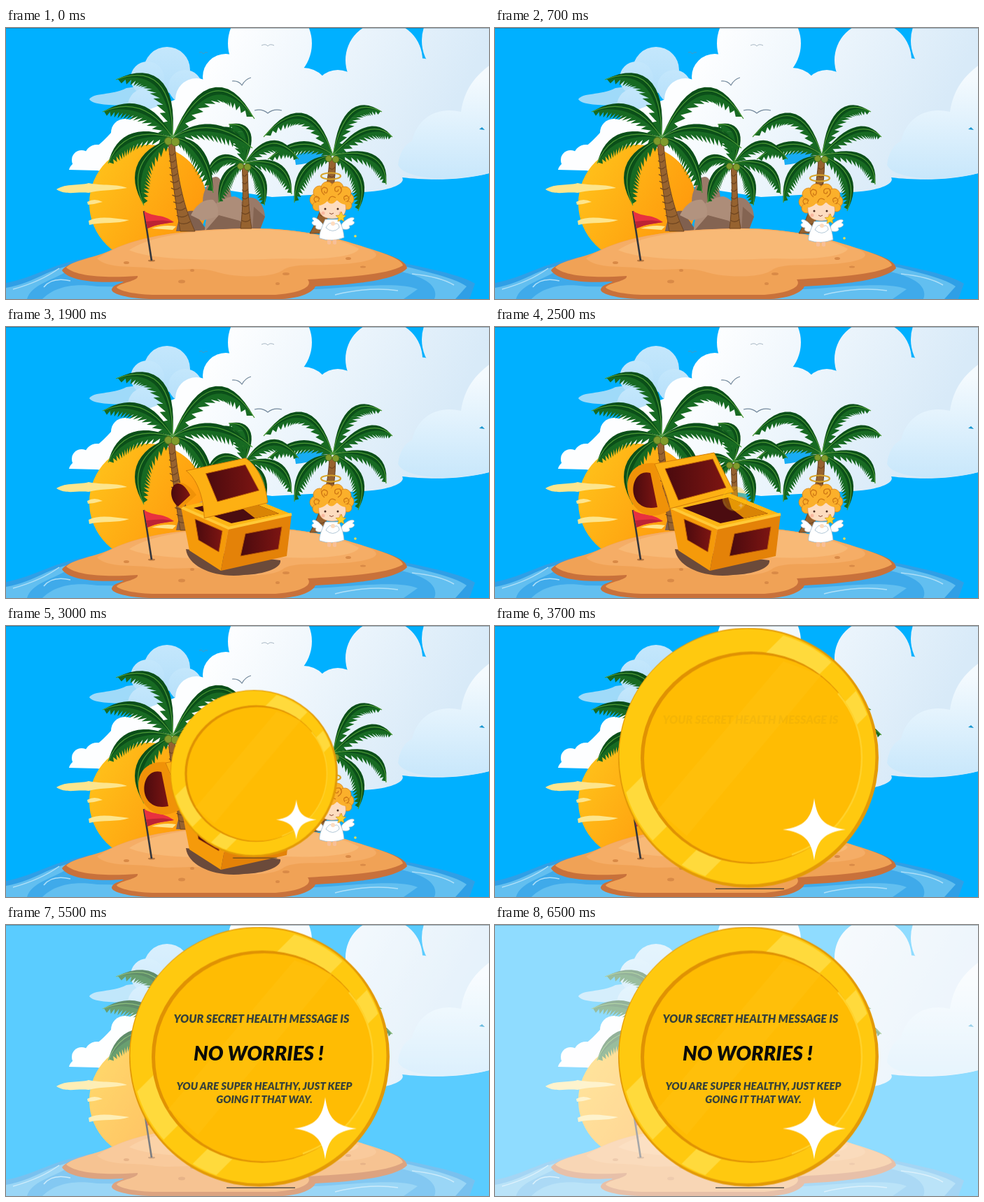
These frames come from a looping animation (690x388 px, 7000 ms). An HTML page:

```html
<!DOCTYPE html>
<html lang="en">
<head>
<meta charset="utf-8">
<title>Treasure island</title>
<style>
html, body { margin: 0; width: 100%; height: 100%; overflow: hidden; background: #00b0ff; }
svg { display: block; width: 100%; height: 100%; }
text { font-family: Lato, "Open Sans", sans-serif; font-style: italic; font-weight: 900; text-anchor: middle; fill: #37413a; }
svg { --ease: cubic-bezier(.37, 0, .63, 1); }
.move { animation: 7s var(--ease) infinite; }
.angel { animation-name: bob; }
.chest { animation-name: chest; }
.veil { animation-name: veil; }
.coin { animation-name: grow; }
.glow { animation-name: glow; }
.intro { animation-name: intro; }
.verdict { animation-name: verdict; }
.shell { animation-name: shell; }
.end { animation-name: end; }
.panel { animation-name: panel; }
.endpanel { animation-name: endpanel; }
.latch { animation-name: latch; }
@keyframes bob { 0% { transform: translateY(0); } 18%, 100% { transform: translateY(5px); } }
@keyframes chest { 0%, 14.29% { opacity: 0; } 25.71%, 100% { opacity: 1; } }
@keyframes veil { 0%, 68.57% { opacity: 0; } 85.71%, 100% { opacity: .56; } }
@keyframes intro { 0%, 51.4% { opacity: 0; } 61.4%, 100% { opacity: 1; } }
@keyframes verdict { 0%, 66.43% { opacity: 0; } 77.14%, 100% { opacity: 1; } }
@keyframes glow { 0%, 32.86% { opacity: 0; } 40%, 100% { opacity: 1; } }
@keyframes grow {
  0%, 32.86% { transform: translate(341px, 250px) scale(.03); }
  50%, 100% { transform: translate(362px, 188.5px) scale(1); }
}
@keyframes shell {
  0%, 22.8% { d: path("M318 288C320 240 308 218 288 216L372 196C398 198 412 230 408 268Z"); }
  31.4%, 100% { d: path("M250 260C246 240 236 215 228 196L313 180C322 198 332 218 341 236Z"); }
}
@keyframes end {
  0%, 22.8% { d: path("M250 258C255 190 325 205 318 288Z"); }
  31.4%, 100% { d: path("M250 262C190 300 160 190 228 195Z"); }
}
@keyframes panel {
  0%, 22.8% { d: path("M330 217L374 206L394 238L344 252Z"); }
  31.4%, 100% { d: path("M243 203L311 189L330 230L262 248Z"); }
}
@keyframes endpanel {
  0%, 22.8% { d: path("M260 256C264 208 300 206 306 274Z"); }
  31.4%, 100% { d: path("M232 258C185 268 190 200 222 209Z"); }
}
@keyframes latch { 0%, 22.8% { opacity: 1; } 25%, 100% { opacity: 0; } }
</style>
</head>
<body>
<svg viewBox="0 0 690 388" preserveAspectRatio="none">
<defs>
  <linearGradient id="sun" x1="0" y1="0" x2="1" y2=".6"><stop stop-color="#ffc61c"/><stop offset="1" stop-color="#ff980c"/></linearGradient>
  <linearGradient id="sky" gradientUnits="userSpaceOnUse" x1="300" y1="40" x2="590" y2="200"><stop stop-color="#fdfeff"/><stop offset="1" stop-color="#d8eaf8"/></linearGradient>
  <linearGradient id="mist" x1="0" y1="0" x2="0" y2="1"><stop offset=".1" stop-color="#f4fafe"/><stop offset="1" stop-color="#c8e7fb"/></linearGradient>
  <linearGradient id="lump" x1="0" y1="0" x2="0" y2="1"><stop stop-color="#c4e7fc"/><stop offset="1" stop-color="#b4dffa"/></linearGradient>
  <linearGradient id="red" x1="0" y1="0" x2="1" y2="0"><stop stop-color="#4a0a0e"/><stop offset="1" stop-color="#7d1512"/></linearGradient>
  <clipPath id="disc"><circle r="181" cx="-1" cy="-1"/></clipPath>
</defs>
<rect width="690" height="388" fill="#00b0ff"/>

<path d="M119 102C126 92 150 97 172 86L215 80L205 108C170 112 124 112 119 102Z" fill="#9fdaf9"/>
<g id="haze" fill="url(#lump)"></g>
<g fill="url(#sky)">
  <g id="clouds"></g>
  <path d="M90 203C94 188 120 184 150 150L190 122L270 92L450 72L690 62V208C650 219 600 218 566 214C572 224 545 234 508 235L380 242L130 204Z"/>
</g>
<path d="M580 162C588 128 616 112 650 120C655 86 672 68 690 54V208C640 220 570 218 560 196C562 178 570 166 580 162Z" fill="url(#mist)"/>
<path d="M412 183Q432 173 456 180Q450 192 414 196Z" fill="#18acf4"/>
<path d="M676 145l4-3 4 4z" fill="#1595cf"/>
<g fill="none" stroke="#74899c" stroke-width="1.2">
  <path d="M323 76Q332 75 337 82Q342 73 350 71M355 118Q366 115 374 122Q382 115 394 118"/>
  <path d="M365 25Q371 22 374 26Q377 22 383 25M276 35Q280 33 282 37Q284 34 288 35" stroke-width="1" opacity=".6"/>
</g>

<circle cx="203" cy="251" r="84" fill="url(#sun)"/>
<g fill="#fde58d">
  <path d="M72 231C86 222 105 226 118 222C136 226 160 223 173 229C150 233 132 232 118 236C100 234 86 240 72 231Z"/>
  <path d="M116 249Q126 243 138 249Q128 252 117 253ZM118 276C135 268 155 273 176 275C160 281 138 277 119 282ZM208 287Q225 281 243 284L238 289Z"/>
</g>

<path d="M0 388V365C45 356 65 337 125 327H530C585 342 645 350 670 366L662 388Z" fill="#2f9fe6"/>
<path d="M0 388V372C45 364 55 345 110 336H550C585 346 640 356 658 370L642 388Z" fill="#62bff0"/>
<path d="M30 388C36 368 64 362 84 350L560 348C590 354 620 366 612 388Z" fill="#3faaea"/>
<path d="M52 388C66 374 90 364 130 370L440 374C490 372 560 362 588 374L568 388Z" fill="#62bff0"/>
<path d="M54 371Q66 356 92 362M580 352Q620 356 640 368M470 382Q520 370 560 376M10 374Q50 363 76 344" stroke="#b0e0f8" stroke-width="1.500" fill="none"/>

<g fill="#9a7a68">
  <path d="M243 291C246 270 254 260 268 262L288 291Z" fill="#80604f"/>
  <path d="M282 258C278 236 288 226 292 216Q304 208 308 222Q322 224 322 246L306 262Z"/>
  <path d="M284 291C284 262 300 244 326 241C340 244 352 262 356 291Z" fill="#ad8d79"/>
  <path d="M336 250C350 234 368 246 370 270L362 291H344Z"/>
  <path d="M264 268Q276 244 296 246Q306 256 302 270L280 276Z" fill="#b2937f"/>
  <path d="M284 291L304 268L334 276L348 291ZM354 256L370 270L362 291H352Z" fill="#846452"/>
</g>

<path d="M80 347C88 334 130 329 150 319C190 300 240 290 350 288C430 288 480 304 520 317C550 325 572 333 573 344C556 362 490 368 442 370C438 380 415 388 390 388H205C175 387 150 381 151 374C154 366 166 366 168 363C120 366 88 360 80 347Z" fill="#c8713b"/>
<path d="M86 343C94 333 130 328 150 318C190 299 240 289 350 287C430 287 480 303 520 316C545 324 566 332 567 340C545 354 480 357 431 360C440 372 415 380 385 382H215C185 382 160 376 158 371C166 364 190 362 188 355C140 358 102 356 86 343Z" fill="#f0a256"/>
<path d="M130 330C170 304 230 288 350 287C430 287 480 303 520 317C540 326 526 335 480 338C440 341 410 336 395 347C375 360 320 356 300 349C270 340 240 350 208 344C180 340 145 345 130 330Z" fill="#f5ad66"/>
<path d="M176 318C210 295 280 289 350 288C420 288 480 302 504 316C500 328 450 332 400 330C340 332 215 336 176 318Z" fill="#f8b976"/>
<g fill="#d98a47">
  <ellipse cx="172" cy="336" rx="4" ry="2"/><ellipse cx="251" cy="363" rx="5" ry="2.5"/><ellipse cx="266" cy="347" rx="3" ry="2"/>
  <ellipse cx="400" cy="352" rx="5" ry="2"/><ellipse cx="489" cy="330" rx="4" ry="2"/><ellipse cx="388" cy="366" rx="3" ry="2"/><ellipse cx="510" cy="342" rx="4" ry="1.5"/>
</g>

<g id="palms"></g>

<ellipse cx="208" cy="333" rx="5" ry="1.5" fill="#b97840"/>
<path d="M197 262L208 333" stroke="#33363c" stroke-width="2.6"/>
<path d="M197 262C214 272 222 265 240 278C226 280 216 281 202 287Z" fill="#e8313f"/>
<path d="M200 277C214 276 224 274 240 278C226 280 216 281 202 287Z" fill="#bd2334"/>

<g class="angel move">
  <ellipse cx="464" cy="212" rx="14" ry="4.5" fill="none" stroke="#d8a52c" stroke-width="2.2"/>
  <g fill="#fff" stroke="#9fb9cc" stroke-width=".8">
    <path d="M452 280C440 266 434 272 440 276C434 278 438 283 443 283C440 288 447 290 455 287ZM480 280C492 267 502 271 495 276C501 278 496 283 490 283C494 288 486 290 478 287Z"/>
    <path d="M456 274C451 286 447 294 448 301Q465 307 483 300C482 290 480 282 475 274Z"/>
  </g>
  <path d="M459 303v6q3 2 5 0v-6zM467 303v6q3 2 5 0v-6z" fill="#f7bf98"/>
  <g fill="#fbb02b" stroke="#d5811a" stroke-width=".8">
    <circle cx="443" cy="246" r="9"/><circle cx="488" cy="245" r="9"/><circle cx="445" cy="255" r="7"/><circle cx="488" cy="254" r="6"/>
    <circle cx="448" cy="235" r="9"/><circle cx="459" cy="229" r="9"/><circle cx="473" cy="229" r="9"/><circle cx="484" cy="236" r="9"/>
    <circle cx="466" cy="243" r="17" stroke="none"/>
  </g>
  <path d="M447 252C452 244 481 244 485 253C488 270 476 273 466 273C456 273 445 269 447 252Z" fill="#fddcc0" stroke="#d78e5a" stroke-width=".7"/>
  <path d="M446 254Q449 238 466 239Q483 239 486 253Q477 252 473 246Q465 256 459 248Q453 254 446 254Z" fill="#fbb02b"/>
  <path d="M455 239q-8-7-1-11q8 1 4 8q-4 1-3-3M474 239q9-6 3-12q-9-1-7 6q4 3 5-2M443 250q-6-5 0-9q7 1 3 7M487 249q6-5 0-9q-7 1-3 7M461 247q2-9 10-4" fill="none" stroke="#cf7714" stroke-width="1.3"/>
  <g fill="#4a2a20"><circle cx="456" cy="259" r="1.5"/><circle cx="474" cy="259" r="1.5"/></g>
  <g fill="#f9b9a0"><circle cx="453" cy="265" r="2.5"/><circle cx="478" cy="265" r="2.5"/></g>
  <path d="M462 265q3 3 6 0" fill="none" stroke="#8a4634"/>
  <path d="M457 286C461 278 465 278 468 282C472 278 476 280 476 286Q467 295 457 286Z" fill="#fff" stroke="#9fb9cc" stroke-width=".8"/>
  <circle cx="467" cy="280" r="3" fill="#fddcc0"/>
  <path d="M479 263l2 5 5 .5-4 3.500 1 5-4-2.500-5 2.500 1-5-4-3.500 5-.5z" fill="#fbd02d" stroke="#c98a14" stroke-width=".6"/>
  <circle cx="499" cy="298" r="1.8" fill="#f2dc4a"/>
</g>

<g class="chest move">
  <path d="M257 318C260 344 300 360 340 355C370 354 394 345 392 334Z" fill="#6b4a3a"/>
  <path d="M250 258L335 238L408 268L318 288Z" fill="#fdb515"/>
  <path d="M268 259L333 244L390 267L322 281Z" fill="#4b0c10"/>
  <path d="M333 244L390 267L356 274L338 260Z" fill="#d98405"/>
  <path d="M250 258L318 288L307 349L262 320Z" fill="#f59a0a"/>
  <path d="M318 288L408 268L401 328L307 349Z" fill="#e48208"/>
  <path d="M250 258L318 288L408 268" fill="none" stroke="#ffc938" stroke-width="4"/>
  <path d="M270 275L309 292L304 322L275 305Z" fill="url(#red)" stroke="#b85b06"/>
  <path d="M342 296L394 286L389 318L335 328Z" fill="url(#red)" stroke="#b85b06"/>
  <path class="end move" d="M250 258C255 190 325 205 318 288Z" fill="#f09208"/>
  <path class="endpanel move" d="M260 256C264 208 300 206 306 274Z" fill="url(#red)"/>
  <path class="shell move" d="M318 288C320 240 308 218 288 216L372 196C398 198 412 230 408 268Z" fill="#fdb013" stroke="#d37d08"/>
  <path class="panel move" d="M330 217L374 206L394 238L344 252Z" fill="url(#red)" stroke="#b85b06"/>
  <path class="latch move" d="M370 265L384 262V280L377 286L370 283Z" fill="#8a4a08"/>
</g>

<rect class="veil move" width="690" height="388" fill="#fff"/>
<rect width="690" height="1" fill="#20404e" opacity=".35"/>

<g class="glow move"><g class="coin move">
  <path d="M-47 188H51" stroke="#222a2c" stroke-width="1.3"/>
  <circle r="186" fill="#e39a06"/>
  <circle cx="-1.500" cy="-1.500" r="183" fill="#ffc90f"/>
  <g clip-path="url(#disc)" fill="#ffda3c">
    <path d="M-230 105L85 -210L152 -170L-175 157Z"/>
    <path d="M-110 168L168 -110L190 -82L-80 188Z"/>
  </g>
  <ellipse cx="4" rx="158" ry="152" fill="#e09203"/>
  <ellipse cx="7" cy="1" rx="156" ry="149" fill="#ffbc03"/>
  <path d="M-130 75L50 -138L104 -118L-88 112Z" fill="#ffc20f" opacity=".6"/>
  <path d="M62 139C125 116 162 62 162 0C162 -34 150 -66 128 -92" fill="none" stroke="#ffd22c" stroke-width="2.5"/>
  <path d="M94 58C98 88 108 99 139 103C108 107 98 118 94 147C90 118 80 107 49 103C80 99 90 88 94 58Z" fill="#fff"/>
</g></g>

<text class="intro move" x="365" y="140" font-size="16.100">YOUR SECRET HEALTH MESSAGE IS</text>
<g class="verdict move">
  <text x="361" y="194" font-size="28.700" style="fill:#0b0b08">NO WORRIES !</text>
  <text x="369" y="236" font-size="15">YOU ARE SUPER HEALTHY, JUST KEEP</text>
  <text x="369" y="255" font-size="14.800">GOING IT THAT WAY.</text>
</g>
</svg>
<script>
const $ = id => document.getElementById(id);
const puffs = list => list.map(([x, y, r]) => {
  return `<path d="M${x - r} ${y}a${r} ${r} 0 1 1 ${2 * r} 0a${r} ${r} 0 1 1 ${-2 * r} 0"/>`;
}).join('');
$('haze').innerHTML = puffs([[230, 60, 33], [202, 72, 24], [256, 84, 24], [200, 112, 26]]);
$('clouds').innerHTML = puffs([
  [130, 185, 18], [108, 189, 14], [170, 150, 20], [272, 102, 30], [314, 70, 33],
  [377, 22, 60], [370, 70, 52], [425, 95, 38], [474, 94, 34], [540, 46, 55], [535, 90, 42], [590, 85, 42], [655, 18, 61]
]);

const pt = (x, y) => x.toFixed(1) + ' ' + y.toFixed(1);

// One curved leaf: comb of blades, longer on the hollow side of the arch.
function frond(x0, y0, [cx, cy, x2, y2], len) {
  const at = t => [0, 1].map(i => {
    const [a, b, c] = i ? [y0, cy, y2] : [x0, cx, x2];
    return (1 - t) * (1 - t) * a + 2 * t * (1 - t) * b + t * t * c;
  });
  const side = Math.sign((x2 - x0) * (cy - y0) - (y2 - y0) * (cx - x0)) || 1;
  const n = 15;
  let comb = '', body = 'M' + pt(x0, y0), back = '';
  for (let i = 1; i < n; i++) {
    const t = i / n, [x, y] = at(t), [px, py] = at(t - .06), [qx, qy] = at(t + .05);
    const d = Math.hypot(qx - px, qy - py), tx = (qx - px) / d, ty = (qy - py) / d;
    const nx = ty * side, ny = -tx * side;
    const l = len * Math.pow(Math.sin(Math.PI * (t * .86 + .12)), .7);
    comb += `M${pt(px, py)}L${pt(x + nx * l + tx * l * .6, y + ny * l + ty * l * .6)}L${pt(qx, qy)}Z`;
    const w = len * .26 * Math.sin(Math.PI * t);
    body += 'L' + pt(x - nx * w, y - ny * w);
    back = 'L' + pt(x + nx * w, y + ny * w) + back;
  }
  const spine = `M${x0} ${y0}Q${cx} ${cy} ${x2} ${y2}`;
  return `<path d="${comb}" fill="#176a22"/><path d="${body}L${x2} ${y2}${back}Z" fill="#0b4f19"/>` +
    `<path d="${spine}" fill="none" stroke="#4c9a35" stroke-width="1.200"/>`;
}

function palm({ x, y, len, trunk, rings, leaves }) {
  const bands = rings.map(([a, b, w]) => `<path d="M${a - w} ${b}Q${a} ${b + 5} ${a + w} ${b - 1}" fill="none" stroke="#6d4420" stroke-width="1.200"/>`).join('');
  return `<path d="${trunk}" fill="#96622f" stroke="#6d4420"/>` + bands +
    leaves.map(l => frond(x, y, l, len)).join('') +
    `<g fill="#7f9b2c" stroke="#56721e"><circle cx="${x - 6}" cy="${y + 5}" r="${len * .26}"/><circle cx="${x + 4}" cy="${y + 6}" r="${len * .28}"/></g>`;
}

const steps = (n, fn) => Array.from({ length: n }, (_, i) => fn(i / n));
$('palms').innerHTML = [
  {
    x: 467, y: 182, len: 17, trunk: 'M462 188H471C470 230 464 260 452 294H434C449 270 460 230 462 188Z',
    rings: steps(8, t => [466 - 20 * t * t, 200 + 90 * t, 4 + 3 * t]),
    leaves: [[432, 84, 368, 156], [486, 92, 537, 120], [425, 148, 374, 188], [520, 124, 552, 156], [542, 168, 543, 224], [414, 190, 412, 250], [524, 206, 503, 262]]
  },
  {
    x: 341, y: 193, len: 17, trunk: 'M337 196H345C346 230 346 260 351 287H335C339 255 339 225 337 196Z',
    rings: steps(7, t => [341 + 2 * t, 210 + 76 * t, 3 + 4 * t]),
    leaves: [[342, 134, 290, 146], [360, 136, 318, 138], [382, 140, 418, 188], [302, 170, 286, 212], [404, 182, 408, 238], [306, 202, 304, 250], [376, 206, 369, 254]]
  },
  {
    x: 238, y: 157, len: 21, trunk: 'M232 166H241C244 212 255 260 270 291H249C242 250 237 210 232 166Z',
    rings: steps(11, t => [237 + 4 * t + 17 * t * t, 180 + 108 * t, 4 + 5 * t]),
    leaves: [[238, 44, 157, 74], [296, 38, 355, 130], [198, 94, 138, 120], [296, 122, 352, 172], [168, 138, 146, 194], [286, 160, 296, 236], [168, 190, 197, 254]]
  }
].map(palm).join('');
</script>
</body>
</html>
```
